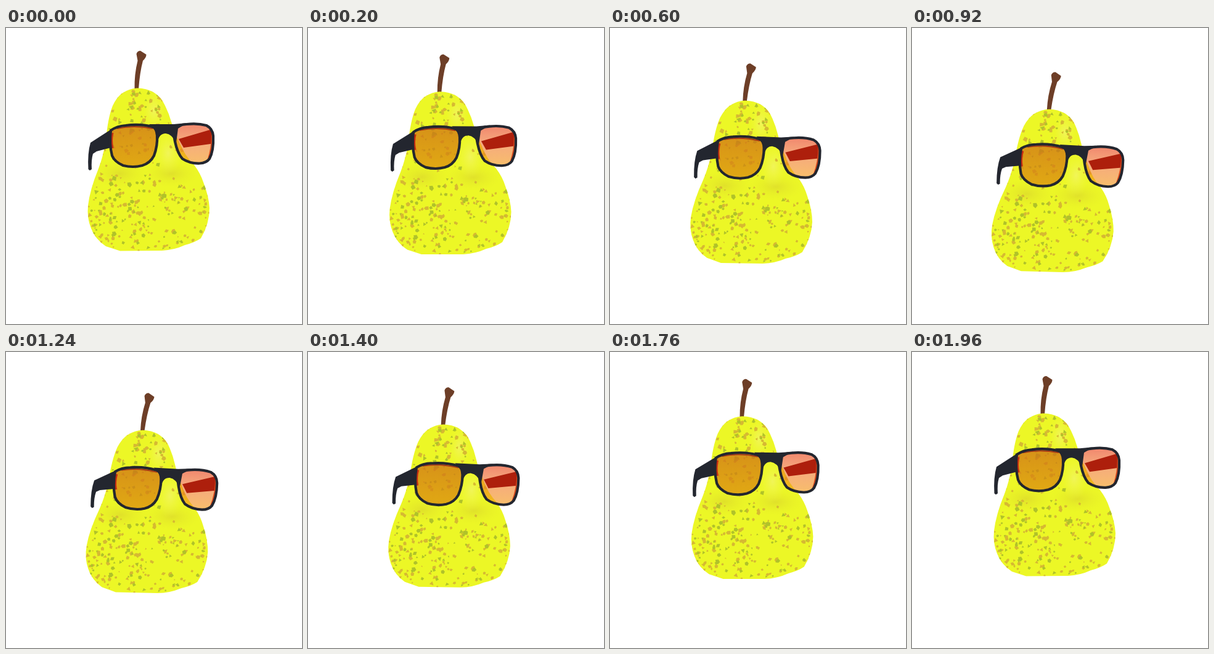
Recreate the animation shown at these times as an HTML page. Size 480 px wide and 480 px high, loop 2 s.

```html
<!DOCTYPE html>
<html lang="en">
<head>
<meta charset="utf-8">
<title>Pear with sunglasses</title>
<style>
html, body { margin: 0; width: 100%; height: 100%; overflow: hidden; background: #fff; }
svg { display: block; width: 100%; height: 100%; }
</style>
</head>
<body>
<svg viewBox="0 0 480 480">
  <defs>
    <path id="body" d="M212 97.500Q226 97 239 104Q252 112 258 126Q264 138 268 152Q273 170 281 185Q289 206 305 222Q315 235 320 250Q329 273 330 292Q330 317 316 341Q306 348 290 352Q273 360 253 361L185 361.500L162 354Q145 343 138 325Q131 308 133 288Q136 262 150 228Q158 207 162 182Q165 146 173 126Q179 113 188 106Q200 98 212 97.500Z"/>
    <path id="left" d="M170 166Q180 159 194 158Q217 155 237 160Q244 162 245 174Q246 191 240 207Q234 219 221 223Q206 227 190 223Q176 217 172 207Q167 187 170 166Z"/>
    <path id="right" d="M273 163Q279 157 293 156Q311 154 325 158Q335 163 336 175Q337 199 330 212Q325 219 314 219.500Q298 220 286 212Q278 203 274 184Q271 171 273 163Z"/>
    <clipPath id="skin"><use href="#body"/></clipPath>
    <clipPath id="glass"><use href="#right"/></clipPath>
    <linearGradient id="amber" x2="0" y2="1">
      <stop stop-color="#cf6e14" stop-opacity=".74"/>
      <stop offset="1" stop-color="#dc8a0c" stop-opacity=".72"/>
    </linearGradient>
    <linearGradient id="sunset" x2="0" y2="1">
      <stop stop-color="#e83c14" stop-opacity=".62"/>
      <stop offset=".45" stop-color="#ee6a18" stop-opacity=".56"/>
      <stop offset="1" stop-color="#f49a18" stop-opacity=".64"/>
    </linearGradient>
    <radialGradient id="shine">
      <stop stop-color="#f4f37a" stop-opacity=".6"/>
      <stop offset="1" stop-color="#f0f648" stop-opacity="0"/>
    </radialGradient>
    <radialGradient id="shade">
      <stop stop-color="#d8d22c" stop-opacity=".6"/>
      <stop offset="1" stop-color="#e4ea28" stop-opacity="0"/>
    </radialGradient>
  </defs>
  <g id="pear">
    <path d="M208.500 99Q208 75 213.500 53L211.500 42Q213 37 218 37L227.500 43Q227.500 48 222 53Q217 72 215 99Z" fill="#6d3e27"/>
    <use href="#body" fill="#ecf726"/>
    <g clip-path="url(#skin)">
      <ellipse cx="268" cy="236" rx="45" ry="22" fill="url(#shade)"/>
      <ellipse cx="185" cy="236" rx="45" ry="24" fill="url(#shade)"/>
      <ellipse cx="240" cy="134" rx="18" ry="32" fill="url(#shine)"/>
      <ellipse cx="263" cy="203" rx="22" ry="36" fill="url(#shine)"/>
      <path id="tan" fill="#d6b932"/>
      <path id="green" fill="#b0c22a"/>
    </g>
  </g>
  <g id="arm">
    <path d="M171 164L137 186Q132 203 133.500 229L136 231L139 229Q138 214 141 204L147 200L170 194Z" fill="#23262f"/>
  </g>
  <g id="shades">
    <use href="#left" fill="url(#amber)"/>
    <use href="#right" fill="url(#sunset)"/>
    <g clip-path="url(#glass)">
      <path d="M280 180L338 163V187L288 194Z" fill="#ad1f0c"/>
      <path d="M334 164Q336 190 328 214" fill="none" stroke="#d84a1c" stroke-width="3"/>
    </g>
    <path d="M173 170Q170 182 173 195" fill="none" stroke="#c52c10" stroke-width="3"/>
    <path d="M180 163Q207 157 238 163" fill="none" stroke="#a83a16" stroke-width="2"/>
    <g fill="none" stroke="#23262f" stroke-width="4.200" stroke-linejoin="round">
      <use href="#left"/>
      <use href="#right"/>
    </g>
    <path d="M232 156L272 156L294 154L279 163L276 186Q269 172 259 171Q248 171 246 185L243 166Z" fill="#23262f"/>
  </g>
</svg>
<script>
const $ = id => document.getElementById(id);
let seed = 29;
const rnd = () => (seed = seed * 16807 % 2147483647) / 2147483647;

// Irregular freckles, sparse just below the glasses
function freckles() {
  const paths = { tan: "", green: "" };
  for (let i = 0; i < 560; i++) {
    const x = 132 + rnd() * 198, y = 99 + rnd() * 262;
    const kind = rnd() < .62 ? "tan" : "green";
    const size = 1.6 + rnd() * 2.3, turn = rnd() * 6.3;
    const corners = 3 + Math.floor(rnd() * 3);
    const points = [];
    for (let k = 0; k < corners; k++) {
      const a = turn + k * 2 * Math.PI / corners, r = size * (.7 + rnd() * .6);
      points.push((x + r * Math.cos(a)).toFixed(1) + " " + (y + r * Math.sin(a)).toFixed(1));
    }
    const bare = y > 205 && y < 243 && rnd() < .7 || x > 250 && y > 160 && y < 252 && rnd() < .7;
    if (!bare) paths[kind] += "M" + points.join("L") + "Z";
  }
  for (const kind in paths) $(kind).setAttribute("d", paths[kind]);
}

// time, then x, y and tilt of the pear, then of the glasses
const keys = [
  [0, 0, 0, 0, 0, 0, 0],
  [400, -.8, 15, 1.45, 2.5, 10, 1.2],
  [600, -1.2, 20.5, 2.6, 4, 20.5, 2.3],
  [920, -2, 34.5, 4, 5.5, 34, 3.4],
  [1240, -1.6, 29.5, 3.6, 5.5, 32.5, 3.3],
  [1560, -.8, 10.5, 1.7, 3.5, 16, 2.1],
  [1680, -.5, 8.5, 1.1, 2, 10, 1.3],
  [1960, 0, 2, 0, 0, .3, 0],
  [2000, 0, 0, 0, 0, 0, 0]
];

function slope(i, c) {
  const a = keys[i - 1], b = keys[i + 1];
  return a && b ? (b[c] - a[c]) / (b[0] - a[0]) : 0;
}

// Cubic Hermite curve through the keys
function at(t, c) {
  const i = keys.findIndex(k => k[0] > t) - 1;
  const a = keys[i], b = keys[i + 1], span = b[0] - a[0];
  const u = (t - a[0]) / span, v = 1 - u;
  return v * v * (1 + 2 * u) * a[c] + u * u * (1 + 2 * v) * b[c]
    + span * u * v * (v * slope(i, c) - u * slope(i + 1, c));
}

function draw() {
  const t = Math.floor(performance.now() % 2000 / 40) * 40;
  const [x, y, lean, gx, gy, tilt] = [1, 2, 3, 4, 5, 6].map(c => at(t, c));
  const shades = `translate(${gx} ${gy}) rotate(${tilt} 250 190)`;
  // The pear half turns, half shears; the arm swings up as the glasses nod
  $("pear").setAttribute("transform", `translate(${x + 231} ${y + 275}) rotate(${lean / 2}) skewX(${-lean / 2}) translate(-231 -275)`);
  $("shades").setAttribute("transform", shades);
  $("arm").setAttribute("transform", `${shades} translate(170 170) skewY(${2 * tilt}) translate(-170 -170)`);
  requestAnimationFrame(draw);
}

freckles();
draw();
</script>
</body>
</html>
```
